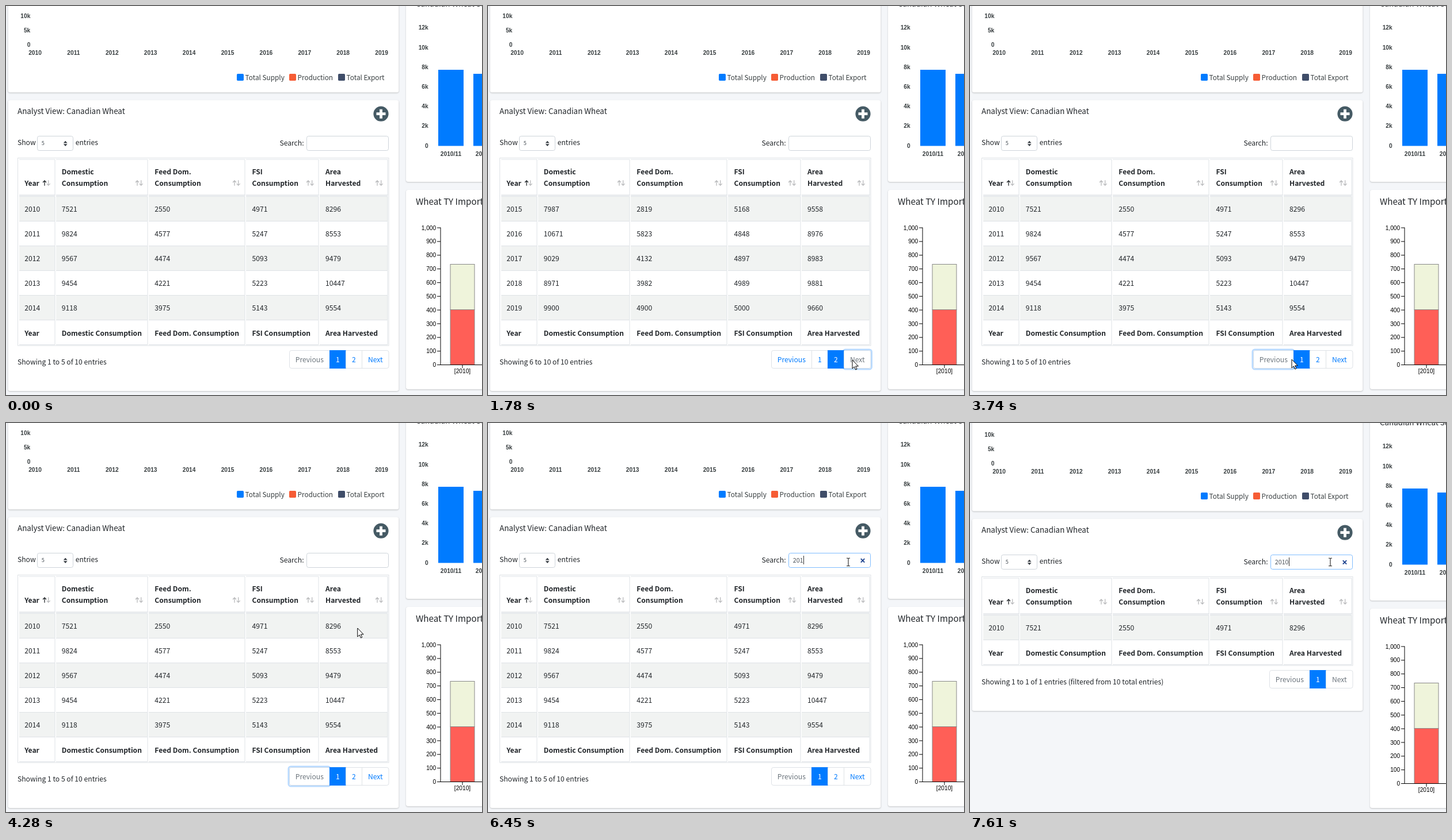
An HTML page for the animation above (8000 ms loop, 827x677 px).

```html
<!DOCTYPE html>
<html lang="en">
<head>
<meta charset="utf-8">
<title>Analyst View</title>
<style>
html, body { margin: 0; width: 100%; height: 100%; overflow: hidden; background: #f4f6f9; }
svg { display: block; width: 827px; height: 677px; }
text { font: 12.15px "Noto Sans CJK JP", "Noto Sans CJK SC", "Noto Sans CJK KR", "Noto Sans CJK", "Noto Sans", sans-serif; fill: #212529; white-space: pre; }
text.b { font-weight: 700; }
text.title { font-size: 13.38px; }
text.big { font-size: 15.2px; }
text.legend { font-size: 11.8px; fill: #373d3f; }
text.field { font-size: 10.66px; fill: #495057; }
text.small { font-size: 9.2px; fill: #495057; }
text.axis, text.tick { font: 700 10.2px "Liberation Sans", Arial, sans-serif; fill: #373d3f; }
text.tick { font-weight: 400; fill: #000; }
.mid { text-anchor: middle; }
.end { text-anchor: end; }
.card { fill: #fff; filter: drop-shadow(0 0 .5px rgba(0,0,0,.125)) drop-shadow(0 1px 1.3px rgba(0,0,0,.2)); }
</style>
</head>
<body>
<svg viewBox="0 0 827 677" id="stage"></svg>
<script>
const LOOP = 8000;
const LINE = '#dee2e6', BLUE = '#007bff', GREY = '#6c757d';
const stage = document.getElementById('stage');

// baselines sit on whole pixels
const text = (x, y, s, cls = '', fill = '') =>
  `<text x="${x}" y="${Math.round(y)}" class="${cls}"${fill && ` style="fill:${fill}"`}>${s}</text>`;
const rect = (x, y, w, h, fill, more = '') =>
  `<rect x="${x}" y="${y}" width="${w}" height="${h}" fill="${fill}" ${more}/>`;
const path = (d, stroke, width = 1, fill = 'none', more = '') =>
  `<path d="${d}" stroke="${stroke}" stroke-width="${width}" fill="${fill}" ${more}/>`;
const card = (x, y, w, h) => rect(x, y, w, h, '#fff', 'rx="3.4" class="card"');
const range = n => [...Array(n).keys()];

// ---------- data ----------
const DATA = [
  [2010, 7521, 2550, 4971, 8296], [2011, 9824, 4577, 5247, 8553],
  [2012, 9567, 4474, 5093, 9479], [2013, 9454, 4221, 5223, 10447],
  [2014, 9118, 3975, 5143, 9554], [2015, 7987, 2819, 5168, 9558],
  [2016, 10671, 5823, 4848, 8976], [2017, 9029, 4132, 4897, 8983],
  [2018, 8971, 3982, 4989, 9881], [2019, 9900, 4900, 5000, 9660]
];
// left, right border, text x
const COLS = [[23, 85, 32.2], [87, 246, 96.8], [248, 415, 258.3], [417, 543, 427.5], [545, 663, 555]];
const HEADS = [['', 'Year'], ['Domestic', 'Consumption'], ['Feed Dom.', 'Consumption'],
  ['FSI', 'Consumption'], ['Area', 'Harvested']];

// ---------- charts ----------
function charts() {
  let s = card(3.5, -20, 679, 170.5) + card(695, -20, 160, 326) + card(695, 320, 160, 347);
  ['10k', '5k', '0'].forEach((v, i) => s += text(42.3, 21.3 + i * 24.6, v, 'axis end'));
  range(10).forEach(i => s += text(50.5 + i * 66.9, 85, 2010 + i, 'axis mid'));
  [[401, 'Total Supply', BLUE], [492, 'Production', '#f65c35'], [577, 'Total Export', '#3f4d69']]
    .forEach(([x, name, c]) => s += rect(x, 118, 12, 12, c, 'rx="1.7"') + text(x + 14.6, 129, name, 'legend'));

  s += text(712, 1.2, 'Canadian Wheat Supply', 'title');
  range(7).forEach(i => s += text(733.7, 41.4 + i * 34.2, i < 6 ? 12 - 2 * i + 'k' : '0', 'axis end'));
  s += rect(751, 111, 44, 132.5, BLUE) + rect(812, 118, 44, 125.5, BLUE);
  s += text(773, 261, '2010/11', 'axis mid') + text(834, 261, '2011/12', 'axis mid');

  s += text(712, 346.3, 'Wheat TY Imports', 'big');
  range(11).forEach(i => {
    const y = 386 + i * 23.85;
    s += text(747.2, y + 3.6, i ? 1000 - 100 * i : '1,000', 'tick end');
    s += path(`M749 ${y}H755`, '#000');
  });
  s += rect(772, 449.5, 42, 79, '#eff4db', 'stroke="#888"') + rect(772, 528.5, 42, 96, '#ff5f57', 'stroke="#888"');
  s += path('M755 385.5V624.5H830M793 624.5V630', '#000') + text(793, 639, '[2010]', 'tick mid');
  return s;
}

// ---------- table ----------
const arrow = (x, up, alpha) => path(up ? 'M0 9.5V.7M-3 3.7L0 .7L3 3.7' : 'M0 0V8.8M-3 5.8L0 8.8L3 5.8',
  '#212529', 1.25, 'none', `opacity="${alpha}" transform="translate(${x} 303.3)"`);

function table(rows) {
  const top = i => Math.round(331.6 + 43.1 * i);
  const foot = top(rows.length);
  let s = rect(20.5, 264.5, 644.5, foot - 220.5, '#fff', `stroke="${LINE}"`);
  COLS.forEach(([l, r, x], c) => {
    const [a, b] = HEADS[c];
    s += path(`M${l} 267H${r}V329.5`, LINE) + path(`M${l} 329.3H${r + .5}`, LINE, 1.7);
    s += text(x, 293, a, 'b') + text(x, 313, b, 'b');
    const ax = c ? r - 18 : 67;
    s += arrow(ax, true, c ? .33 : 1) + arrow(ax + 6.7, false, .33);
    rows.forEach((row, i) => {
      const y = top(i);
      if (i % 2 === 0) s += rect(l, y, r - l, 42, '#f1f3f2');
      s += path(`M${l} ${y - .5}H${r}V${y + 42}`, LINE) + text(x, y + 26, row[c]);
    });
    s += path(`M${l} ${foot - .5}H${r}V${foot + 42.5}H${l}`, LINE);
    s += text(x, foot + 27, (a + ' ' + b).trim(), 'b');
  });
  return s;
}

// ---------- pager ----------
function buttons(page, pages) {
  const list = [['Previous', 70, page === 1]];
  range(pages).forEach(i => list.push([String(i + 1), 28, false]));
  list.push(['Next', 47, page === pages]);
  let x = 665 - list.reduce((sum, b) => sum + b[1], 0);
  return list.map(([label, w, off]) => {
    const b = { label, x, w, off, active: label === String(page) };
    x += w;
    return b;
  });
}
const under = (list, p) => p && p.y >= 599 && p.y < 632 &&
  list.find(b => p.x >= b.x && p.x < b.x + b.w);

function pager(list, hover, focus) {
  const left = list[0].x + .5;
  let s = rect(left, 599.5, 665 - left, 31, '#fff', `rx="3.4" stroke="${LINE}"`);
  list.forEach((b, i) => {
    const hot = b === hover && !b.off && !b.active;
    if (hot) s += rect(b.x + 1, 600, b.w - 1, 30, '#e9ecef', 'rx="1"');
    if (i) s += path(`M${b.x + .5} 599.5V630.5`, LINE);
    if (b.active) s += rect(b.x, 599, b.w + 1, 32, BLUE);
    if (b.label === focus)
      s += rect(b.x - 1.2, 597.8, b.w + 2.8, 34.4, 'none', 'rx="4" stroke="#007bff" stroke-opacity=".27" stroke-width="2.7"');
    const color = b.active ? '#fff' : b.off ? GREY : hot ? '#0056b3' : BLUE;
    s += text(b.x + b.w / 2 + .3, 620, b.label, 'mid', color);
  });
  return s;
}

// ---------- pointer ----------
// start, end, steps, target x, target y
const MOVES = [
  [380, 850, 7, 638, 626], [1250, 1780, 8, 633, 616], [2490, 2790, 5, 581, 617],
  [3030, 3110, 2, 566, 618], [3280, 3350, 2, 556, 617], [3580, 3740, 3, 559, 615],
  [3820, 4360, 8, 628, 271], [4440, 4750, 5, 628.5, 243], [5060, 5060, 1, 626, 242]
];
function pointer(t) {
  if (t < MOVES[0][0]) return null;
  let x = 604, y = 684;
  for (const [a, b, n, tx, ty] of MOVES) {
    if (t < a) break;
    const step = n > 1 ? Math.min(n, 1 + Math.floor((t - a) / (b - a) * (n - 1) + 1e-6)) : 1;
    x += (tx - x) * step / n;
    y += (ty - y) * step / n;
  }
  return { x, y };
}
const SHAPES = {
  arrow: path('M0 0V15L3.4 11.8L5.7 17L8 16L5.7 10.9H10.4Z', '#000', 1, '#fff'),
  hand: path('M-1.5 1Q-1.5 -.6 0 -.6Q1.5 -.6 1.5 1V6Q4 5.4 4.2 7Q6.4 6.4 6.5 8Q8.2 7.8 8.2 9.5V13Q8 15.5 6.5 17V19.3H-1.7V17Q-4 14 -6 10.8Q-6.5 9 -5 8.7Q-3.5 8.8 -1.5 11Z', '#000', 1.1, '#fff')
    + path('M1.5 6V10M4.2 7V10M6.5 8V10.5', '#000'),
  beam: path('M-3 -6.8H-1Q0 -6.8 0 -5.8Q0 -6.8 1 -6.8H3M0 -6V6M-3 6.8H-1Q0 6.8 0 5.8Q0 6.8 1 6.8H3', '#222', 1.1)
};
function kind(p, hover) {
  if (p.y > 226 && p.y < 255 && p.x > 522 && p.x < 665) return 'beam';
  if (hover && !hover.off || p.y > 267 && p.y < 330) return 'hand';
  return 'arrow';
}
const CLICKS = [[1250, 1400, 638, 625], [3580, 3740, 557, 617], [4750, 4910, 626.5, 242]];

// ---------- scene ----------
const KEYS = [5990, 6220, 6450, 6600];
const between = (t, a, b) => t >= a && t < b;

function scene(t) {
  const typed = '2010'.slice(0, KEYS.filter(k => t >= k).length);
  const found = DATA.filter(r => r.some(v => String(v).includes(typed)));
  const filtered = found.length < DATA.length;
  const page = between(t, 1400, 3660) ? 2 : 1;
  const first = (page - 1) * 5;
  const rows = found.slice(first, first + 5);
  const shift = filtered ? 3 : 0;
  const lift = -43 * (5 - rows.length);

  const list = buttons(page, Math.ceil(found.length / 5));
  const p = pointer(t);
  const hover = under(list, p);
  const focus = between(t, 1400, 3580) ? 'Next' : between(t, 3580, 4750) ? 'Previous' : '';
  const editing = t >= 4750;
  const caret = editing && !between(t, 5370, 5830) && !between(t, 7160, 7610);

  let s = `<g transform="translate(0 ${shift})">` + charts() + card(3.5, 164, 679, 506 + lift);
  s += text(20, 188, 'Analyst View: Canadian Wheat', 'title');
  s += '<circle cx="651.5" cy="187.7" r="13.1" fill="#455a64"/>' + path('M651.5 179.7V195.7M643.5 187.7H659.5', '#fff', 4.8);
  s += text(20, 242, 'Show') + text(120.7, 242, 'entries') + text(475.4, 243, 'Search:');
  s += rect(54.5, 226.5, 62, 25, '#fff', 'rx="3.2" stroke="#ced4da"') + text(61.8, 242, '5', 'small');
  s += path('M99.8 238.5L103.2 234.8L106.6 238.5ZM99.8 240.3L103.2 244L106.6 240.3Z', 'none', 0, '#343a40');
  const edge = !editing ? '#ced4da' : t < 4910 ? '#a7c4e4' : '#80bdff';
  s += rect(522.5, 226.5, 142, 25, '#fff', `rx="3.2" stroke="${edge}"`);
  s += text(529.8, 243, typed, 'field');
  if (caret) s += path(`M${Math.round(530 + typed.length * 5.95) + .5} 231V246`, '#333');
  if (typed) s += path('M647.8 236.2L654.2 242.6M654.2 236.2L647.8 242.6', '#1f4590', 1.9);
  s += table(rows);

  let info = `Showing ${first + 1} to ${first + rows.length} of ${found.length} entries`;
  if (filtered) info += ` (filtered from ${DATA.length} total entries)`;
  s += `<g transform="translate(0 ${lift})">` + text(20, 624, info) + pager(list, hover, focus) + '</g></g>';

  for (const [a, b, x, y] of CLICKS)
    if (between(t, a, b)) s += `<circle cx="${x}" cy="${y}" r="9.8" fill="#f6ee20" opacity=".85"/>`;
  if (p) s += `<g transform="translate(${p.x} ${p.y})">${SHAPES[kind(p, hover)]}</g>`;
  return s;
}

let last = '';
const start = performance.now();
function draw() {
  const s = scene((performance.now() - start) % LOOP);
  if (s !== last) stage.innerHTML = last = s;
  requestAnimationFrame(draw);
}
draw();
</script>
</body>
</html>
```
